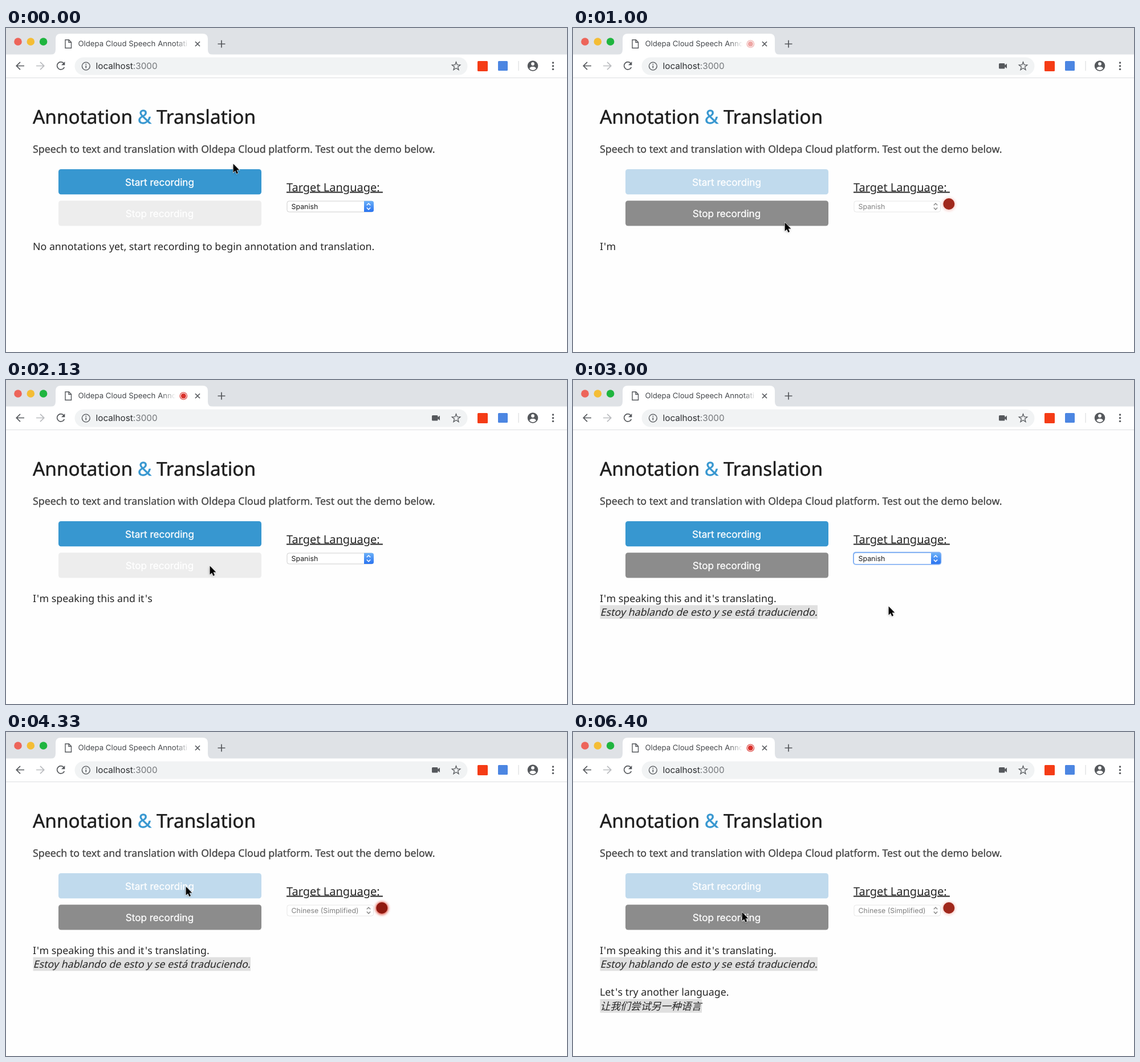
Recreate the animation shown at these times as an HTML page. Size 984x569 px, loop 7.53 s.

```html
<!DOCTYPE html>
<html lang="en">
<head>
<meta charset="utf-8">
<title>Annotation &amp; Translation</title>
<style>
html, body { margin: 0; width: 100%; height: 100%; overflow: hidden; background: #fefefe; }
svg { display: block; }
text { text-rendering: geometricPrecision; white-space: pre; }
.ui { font-family: Inter, Roboto, sans-serif; }
.page { font-family: "Noto Sans", "Noto Sans CJK SC", "Noto Sans CJK", sans-serif; font-size: 17.8px; fill: #262626; }
.line { fill: none; stroke: #55585c; stroke-width: 1.7; }
.btn { font-size: 17.1px; text-anchor: middle; fill: #fff; stroke: #fff; stroke-width: .3; }
</style>
</head>
<body>
<svg width="984" height="569" viewBox="0 0 984 569">
  <defs>
    <linearGradient id="fade">
      <stop offset="0" stop-color="#fff" stop-opacity="0"/><stop offset="1" stop-color="#fff"/>
    </linearGradient>
    <linearGradient id="blue" x2="0" y2="1">
      <stop offset="0" stop-color="#6bb0f8"/><stop offset="1" stop-color="#2a73f0"/>
    </linearGradient>
    <filter id="blur" x="-50%" y="-50%" width="200%" height="200%"><feGaussianBlur stdDeviation="2.2"/></filter>
  </defs>

  <!-- browser window -->
  <rect width="984" height="47" fill="#dfe2e6"/>
  <rect y="46.5" width="984" height="40.5" fill="#fff"/>
  <rect y="87" width="984" height="1" fill="#dcdee0"/>
  <circle cx="21" cy="24" r="6.8" fill="#ed655a"/>
  <circle cx="43.3" cy="24" r="6.8" fill="#f4bd35"/>
  <circle cx="65.6" cy="24" r="6.8" fill="#1fb53f"/>
  <path d="M78 47q9 0 9-9V19q0-9 9-9H345q9 0 9 9V38q0 9 9 9z" fill="#fff"/>
  <path class="line" style="stroke-width:1.4" d="M104 20.7h6.3l4.2 4.3v10.3h-10.5zM110 20.7v4.6h4.5"/>
  <text class="ui" x="126.5" y="32.3" font-size="13.2" fill="#45484c">Oldepa Cloud Speech Annotati</text>
  <g id="mask"><rect x="-24" y="18" width="24.5" height="20" fill="url(#fade)"/><rect y="18" width="30" height="20" fill="#fff"/></g>
  <g id="tabDot"><circle cx="311.3" cy="28" r="6.3" fill="none" stroke="#d9302b" stroke-width="1.1"/><circle cx="311.3" cy="28" r="4.6" fill="#d9302b"/></g>
  <path class="line" d="M332 24l8 8m0-8l-8 8M371.5 28h13m-6.500-6.500v13"/>
  <path class="line" d="M32 66.500H18.500m6.500-6.700l-6.700 6.700 6.700 6.700"/>
  <path class="line" style="stroke:#b9bbbe" d="M53 66.500h13.500m-6.500-6.700l6.700 6.700-6.700 6.700"/>
  <path class="line" d="M101.400 62.200a6.600 6.600 0 1 0 .9 6.600"/>
  <path d="M103.300 59v6.300H97z" fill="#55585c"/>
  <rect x="120.500" y="51.500" width="689" height="31" rx="15.500" fill="#f1f3f4"/>
  <circle class="line" style="stroke-width:1.400" cx="140.300" cy="67" r="6.900"/>
  <path class="line" style="stroke-width:1.600" d="M140.300 66v4.600m0-7.800v1.700"/>
  <text class="ui" x="157.500" y="72.200" font-size="15.300" fill="#2b2d30">localhost<tspan fill="#74777b">:3000</tspan></text>
  <path id="camera" d="M748.500 62h7.500q1.500 0 1.500 1.500v2l3.500-3v8.600l-3.500-3v2q0 1.500-1.500 1.500h-7.500q-1.500 0-1.500-1.500v-6.600q0-1.500 1.500-1.500z" fill="#55585c"/>
  <path id="star" class="line" style="stroke-width:1.300"/>
  <rect x="827" y="58" width="18" height="18" rx="1.500" fill="#f53c16"/>
  <rect x="863" y="58" width="17" height="17" rx="1.500" fill="#4c86e2"/>
  <rect x="898.500" y="58" width="1" height="17" fill="#d5d7da"/>
  <circle cx="924" cy="66.500" r="9.300" fill="#55585c"/>
  <circle cx="924" cy="63" r="2.900" fill="#fff"/>
  <path d="M918.200 70.700q1.600-3 5.800-3t5.800 3q-2 3.200-5.800 3.200t-5.800-3.200z" fill="#fff"/>
  <g fill="#55585c"><circle cx="959.500" cy="61" r="1.700"/><circle cx="959.500" cy="66.700" r="1.700"/><circle cx="959.500" cy="72.400" r="1.700"/></g>

  <!-- page -->
  <g class="page">
    <text x="47" y="168" style="font-size:33.400px" fill="#1e1e1e" stroke="#1e1e1e" stroke-width=".5">Annotation <tspan fill="#3797d0" stroke="#3797d0">&amp;</tspan> Translation</text>
    <text x="47" y="219" fill="#424242" stroke="#424242" stroke-width=".3">Speech to text and translation with Oldepa Cloud platform. Test out the demo below.</text>
    <text x="492" y="286.500" style="font-size:20px" text-decoration="underline">Target Language: </text>
    <text id="first" x="47" y="390"></text>
    <g id="spanish">
      <rect x="47.500" y="395.500" width="381.500" height="24" fill="#e0e0e0"/>
      <text transform="translate(47.500 414) skewX(-14)" lang="es">Estoy hablando de esto y se está traduciendo.</text>
    </g>
    <text id="second" x="47" y="463"></text>
    <g id="chinese">
      <rect x="47.500" y="469" width="178.500" height="24" fill="#e0e0e0"/>
      <text transform="translate(47.500 488) skewX(-14)" lang="zh-Hans">让我们尝试另一种语言</text>
    </g>
  </g>

  <g class="ui">
    <rect id="start" x="92" y="248" width="356" height="44.300" rx="4.500"/>
    <text class="btn" x="269.500" y="276.500">Start recording</text>
    <rect id="stop" x="92" y="303.300" width="356" height="44.300" rx="4.500"/>
    <text class="btn" x="269.500" y="332">Stop recording</text>

    <rect id="ring" x="491" y="301.800" width="155.300" height="23" rx="5" fill="#86b3f3"/>
    <rect id="box" x="493" y="304" width="151.500" height="19" rx="3.500" fill="#fff"/>
    <path id="knob" d="M628 303.800h13.500q3.500 0 3.500 3.500v12.200q0 3.500-3.500 3.500H628z" fill="url(#blue)"/>
    <path id="arrows" d="M632.800 311.300l3.200-3.300 3.200 3.300m-6.400 4.200l3.200 3.300 3.200-3.300" fill="none" stroke-width="1.500"/>
    <text id="lang" x="500.500" y="318" font-size="12.400"></text>
  </g>

  <g id="rec">
    <circle id="glow" cx="659.300" cy="309.500" r="11.500" fill="#dc3a2c" filter="url(#blur)"/>
    <circle id="dot" cx="659.300" cy="309" r="10"/>
  </g>

  <g id="cursor">
    <path d="M0 1.500V17l3.600-3.300L6 19l2.700-1.200-2.400-5.100h4.800z" fill="#000" opacity=".3" filter="url(#blur)"/>
    <path d="M.6.600V15.700l3.500-3.300 2.400 5.500 2.500-1.100-2.400-5.300h4.800z" fill="#000" stroke="#fff" stroke-width="1.100" paint-order="stroke"/>
  </g>
</svg>

<script>
const LOOP = 7530, FPS = 15;
const $ = id => document.getElementById(id);
const set = (id, name, value) => $(id).setAttribute(name, value);
const show = (id, on) => set(id, "visibility", on ? "visible" : "hidden");

// first and last tick of every active stretch; the picture holds in between
const active = [[0, 8], [10, 20], [22, 29], [31, 42], [43, 52], [57, 62],
  [64, 69], [72, 83], [84, 94], [96, 96]];

// tick, x, y
const path = [[0, 398, 238], [4, 388, 270], [8, 386, 276], [9, 386, 276], [14, 371, 341],
  [29, 371, 341], [31, 357, 326], [32, 357, 326], [38, 568, 312], [39, 568, 312],
  [42, 571, 362], [45, 553, 397], [47, 553, 397], [52, 551, 351], [56, 551, 351],
  [62, 315, 271], [67, 315, 271], [69, 309, 285], [71, 309, 285], [76, 296, 316]];

const firstText = [[0, "No annotations yet, start recording to begin annotation and translation."],
  [14, "I'm"], [23, "I'm speaking"], [25, "I'm speaking this"], [27, "I'm speaking this and"],
  [29, "I'm speaking this and it's"], [43, "I'm speaking this and it's translating."]];
const secondText = [[0, ""], [80, "Let's"], [82, "Let's try"], [87, "Let's try another"],
  [91, "Let's try another language."]];

const latest = (rows, k) => rows.filter(r => r[0] <= k).pop();
const between = (k, a, b) => k >= a && k < b;
const wave = (k, peak, period) => .5 + .5 * Math.cos(2 * Math.PI * (k - peak) / period);

function setText(id, rows, k) {
  $(id).innerHTML = latest(rows, k)[1].replace(/'./g, s => `<tspan dx="1 1">${s}</tspan>`);
}

function moveCursor(k) {
  const i = path.indexOf(latest(path, k));
  const [a, x, y] = path[i], [b, x2, y2] = path[i + 1] || [a + 1, x, y];
  const u = Math.min(1, (k - a) / (b - a)), e = u * u * (3 - 2 * u);
  set("cursor", "transform", `translate(${x + (x2 - x) * e} ${y + (y2 - y) * e})`);
}

function draw(tick) {
  const k = Math.min(tick, latest(active, tick)[1]);
  const recording = between(k, 5, 31) || k >= 64;
  const tabOn = between(k, 7, 44) || k >= 67;
  const focus = between(k, 39, 64);

  show("camera", k >= 6);
  show("tabDot", tabOn);
  set("tabDot", "opacity", .4 + .6 * wave(k, k < 50 ? 32.5 : 84, 12.2));
  set("mask", "transform", `translate(${tabOn ? 297 : 321} 0)`);

  set("start", "fill", recording ? "#c0daed" : "#3797d0");
  set("stop", "fill", recording || k >= 44 ? "#8c8c8c" : "#ededed");

  show("ring", focus);
  show("knob", !recording);
  set("box", "stroke", recording ? "#e6e6e6" : focus ? "none" : "#cfcfcf");
  set("arrows", "stroke", recording ? "#8a8a8a" : "#fff");
  set("lang", "fill", recording ? "#808080" : "#1c1c1c");
  $("lang").textContent = k < 57 ? "Spanish" : "Chinese (Simplified)";

  const heat = wave(k, k < 50 ? 5 : 65, 21);
  show("rec", recording);
  set("glow", "opacity", .25 + .55 * heat);
  set("dot", "fill", `rgb(${160 - 16 * heat} ${40 - 14 * heat} ${28 - 12 * heat})`);

  setText("first", firstText, k);
  setText("second", secondText, k);
  show("spanish", k >= 44);
  show("chinese", k >= 96);
  moveCursor(k);
}

const starPoints = Array.from({ length: 10 }, (_, i) => {
  const r = i % 2 ? 3.2 : 7.6, a = i * Math.PI / 5;
  return `${789.5 + r * Math.sin(a)} ${67.3 - r * Math.cos(a)}`;
});
set("star", "d", `M${starPoints.join("L")}z`);

let last = -1;
function loop() {
  const tick = Math.floor(performance.now() % LOOP * FPS / 1000 + .05);
  if (tick !== last) draw(last = tick);
  requestAnimationFrame(loop);
}
loop();
</script>
</body>
</html>
```
